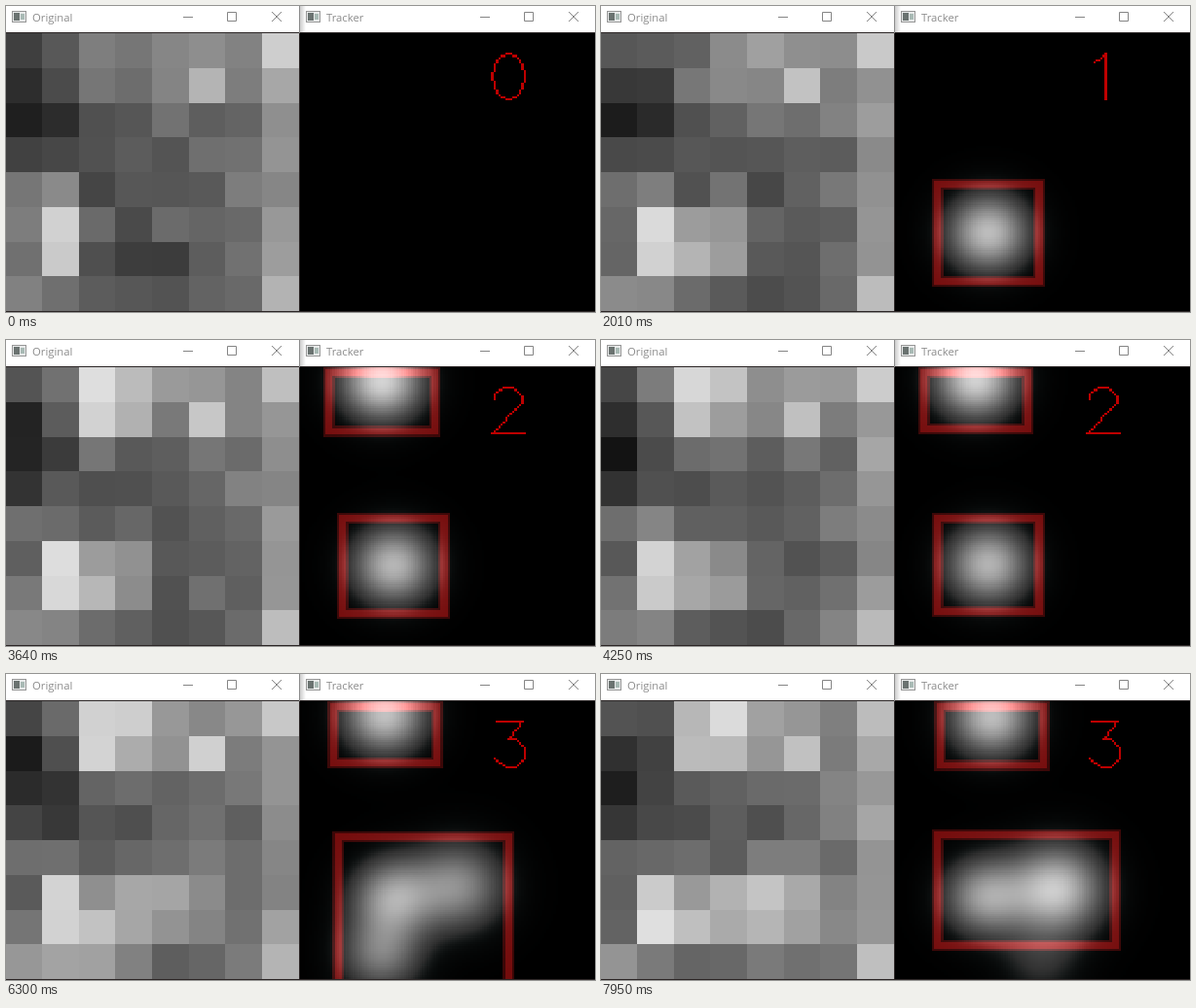
These frames come from a looping animation (605x315 px, 8000 ms). An HTML page with a canvas:

```html
<!DOCTYPE html>
<html lang="en">
<head>
<meta charset="utf-8">
<title>Thermal tracker</title>
<style>
  html, body { margin: 0; width: 605px; height: 315px; overflow: hidden; background: #fff; }
  canvas { display: block; }
</style>
</head>
<body>
<canvas id="stage" width="605" height="315"></canvas>
<script>
const LOOP = 8000, CELLS = 8, SIZE = 128, PITCH = SIZE / CELLS;
const TRACKED = 40, EDGE = 22.6; // heat that counts as a body, heat at its outline
const stage = document.getElementById('stage');
const ctx = stage.getContext('2d');
const view = document.createElement('canvas');
view.width = view.height = SIZE;
const low = view.getContext('2d');
const image = low.createImageData(SIZE, SIZE);

const clamp = v => Math.max(0, Math.min(1, v));
const mix = (a, b, f) => a + (b - a) * f;
const smooth = f => f * f * (3 - 2 * f);
const glow = (x, y, s) => s.level * Math.exp(-((x - s.x) ** 2 + (y - s.y) ** 2) / s.radius ** 2);
const total = (spots, x, y) => spots.reduce((sum, s) => sum + glow(x, y, s), 0);

// Resting warmth of the room, in cell units.
const room = [
  { x: 0, y: 1.7, radius: 1.5, level: -55 },
  { x: 4, y: -0.5, radius: 2, level: 60 },
  { x: 5, y: 1, radius: 0.6, level: 75 },
  { x: 2.3, y: 1, radius: 0.7, level: 35 },
  { x: 1, y: 5.5, radius: 0.7, level: 175 },
  { x: 0.5, y: 4, radius: 0.8, level: 50 },
  { x: 0.3, y: 7, radius: 0.9, level: 65 },
  { x: 3.5, y: 6.5, radius: 0.8, level: -30 },
  { x: 7, y: 0, radius: 0.7, level: 40 },
  { x: 7, y: 7, radius: 0.7, level: 40 }
];
const roomLevel = (c, r) => 84 + 65 * Math.exp(c - 7) + total(room, c, r);

// Warm bodies; each path point is time, x, y, heat.
const sitter = { radius: 1.1, path: [[290, 2.5, 5.75, 0], [600, 2.5, 5.75, 30], [830, 2.5, 5.75, 114],
  [4250, 2.5, 5.65, 105], [5430, 2.5, 5.6, 88], [7950, 2.4, 5.6, 90]] };
const upper = { radius: 1.1, path: [[3010, 2.2, 0.4, 0], [3250, 2.2, 0.4, 125],
  [5430, 2.1, 0.2, 122], [7160, 2.45, 0.5, 105], [7950, 2.6, 0.4, 112]] };
const visitor = { radius: 1.25, path: [[6140, 4.25, 5.3, 0], [6300, 4.25, 5.3, 112], [7950, 4.35, 5.4, 116]] };
const limb = { radius: 1.1, path: [[4250, 2.3, 7.2, 0], [5430, 2.3, 7.2, 65],
  [7160, 2, 7.3, 75], [7950, 4.1, 7.5, 22]] };
const bodies = [sitter, upper, visitor, limb];
const people = [sitter, upper, visitor];
const groups = [[sitter, visitor, limb], [upper]];

// Short false detections: x, y, start, end.
const sparks = [[7, 0.3, 980, 1370], [5.1, 2.1, 2760, 3060], [2.1, 3.1, 2760, 3060]];

function random(seed) {
  const v = Math.sin(seed * 12.9898 + 4.137) * 43758.5453;
  return v - Math.floor(v);
}

function moveBody(body, t) {
  const { path } = body;
  const next = path.findIndex(point => point[0] > t);
  const b = path[next < 0 ? path.length - 1 : next];
  const a = path[next < 0 ? path.length - 1 : Math.max(0, next - 1)];
  const f = a === b ? 0 : (t - a[0]) / (b[0] - a[0]);
  [, body.x, body.y, body.level] = a.map((v, i) => mix(v, b[i], f));
}

// The screen refreshes in bursts of three quick steps and a pause.
function refreshAt(time) {
  const period = 341.4, burst = Math.floor((time - 290) / period);
  const start = 290 + burst * period;
  const k = Math.min(2, Math.floor((time - start) / 80));
  return { t: start + k * 80, step: burst * 3 + k + 3 };
}

function drawSensor(spots, step) {
  const left = c => Math.floor(c * 301 / CELLS), top = r => 28 + Math.round(r * 286 / CELLS);
  for (let r = 0; r < CELLS; r++) {
    for (let c = 0; c < CELLS; c++) {
      const seed = step * 64 + r * 8 + c;
      const noise = (random(seed) + random(seed + 9000) - 1) * 22;
      const level = Math.round(roomLevel(c, r) + total(spots, c, r) + noise);
      ctx.fillStyle = `rgb(${level},${level},${level})`;
      ctx.fillRect(left(c), top(r), left(c + 1) - left(c), top(r + 1) - top(r));
    }
  }
}

function drawHeat(spots) {
  for (let i = 0; i < SIZE * SIZE; i++) {
    const heat = total(spots, (i % SIZE) / PITCH, Math.floor(i / SIZE) / PITCH);
    const body = smooth(clamp((heat - 8) / 22));
    const level = 1.7 * heat * mix(0.45, 1, body);
    image.data.set([level * mix(0.75, 1, body), level, level, 255], i * 4);
  }
  low.putImageData(image, 0, 0);
}

function drawBox(group) {
  const found = group.filter(body => body.level > TRACKED);
  if (!found.length) return;
  const reach = body => body.radius * Math.sqrt(Math.log(body.level / EDGE));
  const pixel = cell => Math.round(cell * PITCH) + 0.5;
  const left = pixel(Math.min(...found.map(b => b.x - reach(b))));
  const right = pixel(Math.max(...found.map(b => b.x + reach(b))));
  const top = pixel(Math.max(0.1, Math.min(...found.map(b => b.y - reach(b)))));
  const bottom = pixel(Math.max(...found.map(b => b.y + reach(b))));
  low.globalCompositeOperation = 'lighter';
  low.strokeStyle = 'rgb(58,6,6)';
  for (const width of [5, 3]) {
    low.lineWidth = width;
    low.strokeRect(left, top, right - left, bottom - top);
  }
  low.globalCompositeOperation = 'source-over';
}

function arc(cx, cy, rx, ry, from, to) {
  return Array.from({ length: 17 }, (_, i) => {
    const angle = mix(from, to, i / 16) * Math.PI / 180;
    return [cx + rx * Math.cos(angle), cy + ry * Math.sin(angle)];
  });
}

// Digits as pen strokes, 21 units high, y up.
const digits = [
  arc(10, 10.5, 7, 10.5, 0, 360),
  [[6, 17], [8, 18], [11, 21], [11, 0]],
  [...arc(10, 15.5, 6, 5.5, 170, -30), [3, 0], [17, 0]],
  [[5, 21], [16, 21], [10, 13], ...arc(10.5, 6.5, 6.5, 6.5, 75, -160)]
];

function drawDigit(n) {
  low.fillStyle = '#be0000';
  const points = digits[n].map(point => point.map(Math.round));
  for (let i = 1; i < points.length; i++) {
    const [x1, y1] = points[i - 1], [x2, y2] = points[i];
    const count = Math.max(Math.abs(x2 - x1), Math.abs(y2 - y1), 1);
    for (let k = 0; k <= count; k++) {
      low.fillRect(80 + Math.round(mix(x1, x2, k / count)), 30 - Math.round(mix(y1, y2, k / count)), 1, 1);
    }
  }
}

function drawTitle(x, width, title, buttons) {
  const box = (color, dx, y, w, h) => {
    ctx.fillStyle = color;
    ctx.fillRect(x + dx, y, w, h);
  };
  box('#fff', 0, 0, width, 27);
  // Window icon
  box('#969696', 6, 5, 15, 12);
  box('#e8eaea', 7, 6, 13, 10);
  box('#6b7371', 8, 7, 6, 8);
  box('#a9bab5', 15, 8, 4, 6);

  ctx.fillStyle = '#8b8b8b';
  ctx.font = '11.3px "Open Sans", "Noto Sans", sans-serif';
  ctx.fillText(title, x + 27, 16);

  ctx.strokeStyle = '#858585';
  ctx.lineWidth = 1;
  ctx.beginPath();
  ctx.moveTo(buttons, 11.5);
  ctx.lineTo(buttons + 10, 11.5);
  ctx.rect(buttons + 45.5, 6.5, 9, 9);
  ctx.moveTo(buttons + 91, 6);
  ctx.lineTo(buttons + 101, 16);
  ctx.moveTo(buttons + 101, 6);
  ctx.lineTo(buttons + 91, 16);
  ctx.stroke();
}

function drawWindows() {
  ctx.fillStyle = '#2c2626';
  ctx.fillRect(0, 0, 605, 315);
  drawTitle(0, 301, 'Original', 182);
  drawTitle(302, 303, 'Tracker', 487);
  ctx.fillStyle = '#8c8c8c';
  ctx.fillRect(301, 0, 1, 28);
  const shadow = ctx.createLinearGradient(302, 0, 308, 0);
  shadow.addColorStop(0, 'rgba(0,0,0,.2)');
  shadow.addColorStop(1, 'rgba(0,0,0,0)');
  ctx.fillStyle = shadow;
  ctx.fillRect(302, 0, 6, 27);
}

function draw(now) {
  const { t, step } = refreshAt(now % LOOP);
  bodies.forEach(body => moveBody(body, t));
  const spots = bodies.filter(body => body.level > 0);
  for (const [x, y, start, end] of sparks) {
    if (t >= start && t < end) spots.push({ x, y, radius: 0.65, level: 58 });
  }

  drawWindows();
  drawSensor(spots, step);
  drawHeat(spots);
  groups.forEach(drawBox);
  drawDigit(people.filter(body => body.level > TRACKED).length);
  ctx.imageSmoothingEnabled = false;
  ctx.drawImage(view, 302, 28, 303, 286);
}

function frame() {
  draw(performance.now());
  requestAnimationFrame(frame);
}
frame();
</script>
</body>
</html>
```
